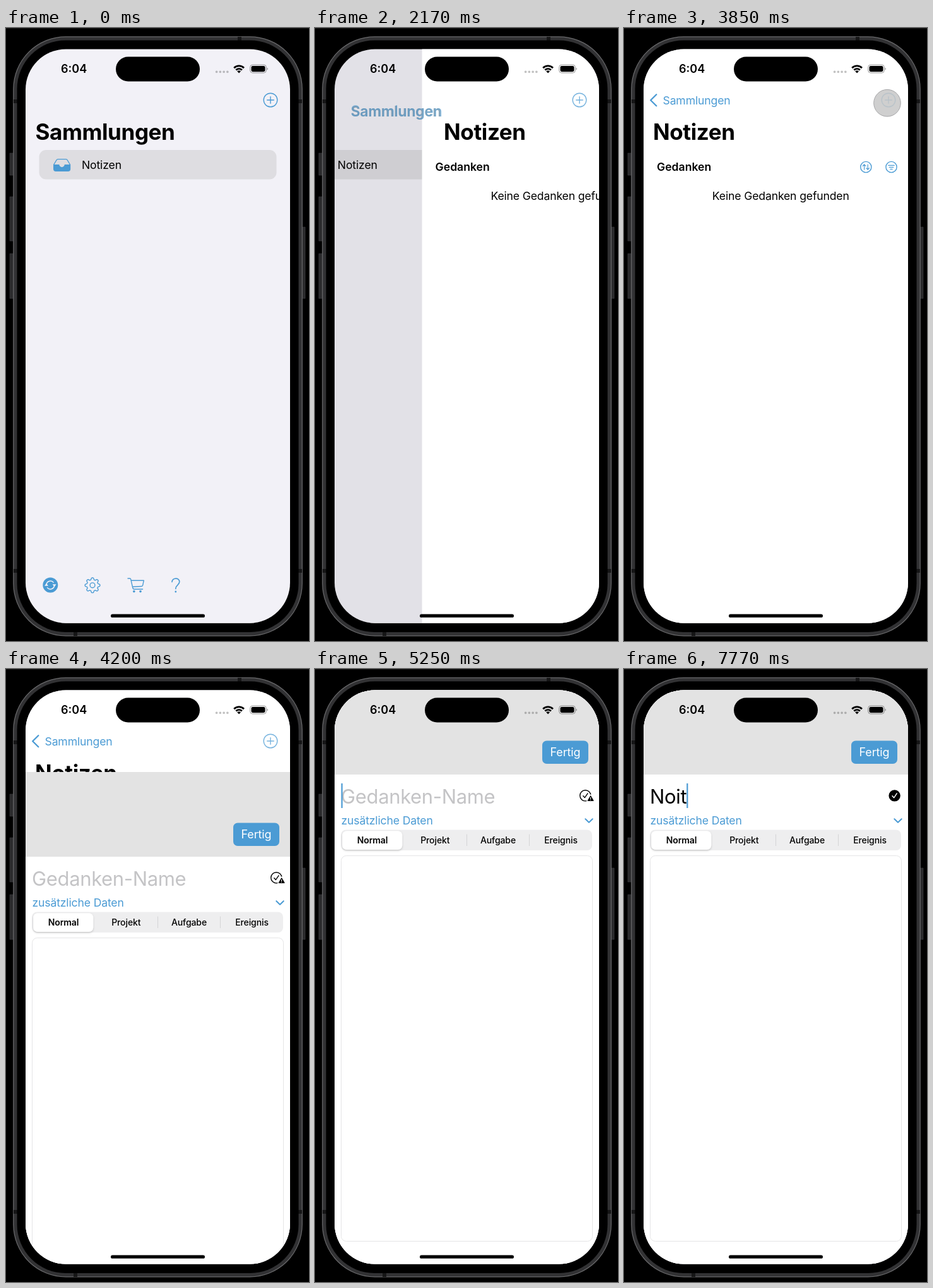
These frames come from a looping animation (480 by 970 pixels, 8 s). An HTML page:

```html
<!DOCTYPE html>
<html lang="de">
<head>
<meta charset="utf-8">
<title>Notizen</title>
<style>
  html, body { margin: 0; width: 100%; height: 100%; overflow: hidden; background: #000; }
  svg { display: block; width: 480px; height: 970px; }
  text { font: 17.6px Inter, sans-serif; letter-spacing: -.15px; white-space: pre; }
  .mid { text-anchor: middle; }
  .semi { font-weight: 600; letter-spacing: 0; }
  .large { font-size: 35px; font-weight: 700; letter-spacing: -.4px; }
  .name { font-size: 31px; letter-spacing: -.35px; }
  .seg { font-size: 14px; font-weight: 500; letter-spacing: -.1px; text-anchor: middle; }
  .blue { fill: #4b9bd4; }
  .line { fill: none; stroke: #4b9bd4; stroke-width: 1.4; stroke-linecap: round; stroke-linejoin: round; }
</style>
</head>
<body>
<svg viewBox="0 0 480 970">
  <defs>
    <clipPath id="screen"><rect x="31" y="33.5" width="419" height="908" rx="64"/></clipPath>
    <filter id="soft" x="-10%" y="-20%" width="120%" height="150%">
      <feDropShadow dx="0" dy="1.5" stdDeviation="1.5" flood-opacity=".2"/>
    </filter>
  </defs>

  <!-- phone body -->
  <path d="M0 .5H480" stroke="#161616"/>
  <path d="M6 198h6v35h-6zM6 267h6v70h-6zM6 357h6v71h-6zM469 315h5v113h-5z" fill="#2b2b2d" stroke="#3c3c3e" stroke-width=".6"/>
  <rect x="11.8" y="13.8" width="457.4" height="948" rx="83" fill="#323234" stroke="#6a6a6c" stroke-width="1.2"/>
  <path d="M12 116h6M463 116h6M12 859h6M463 859h6M370 14v6M110 956v6" stroke="#161617" stroke-width="6"/>
  <rect x="17.5" y="19.5" width="446" height="936.5" rx="77"/>

  <g clip-path="url(#screen)">
    <rect x="31" y="33" width="419" height="909" fill="#f2f1f7"/>

    <g id="list">
      <rect x="52.5" y="193" width="376" height="46.5" rx="11" fill="#dedde1"/>
      <path class="line" d="M75.8 216L80 209Q80.8 207.6 82.3 207.6H95Q96.4 207.6 97.2 209L101.4 216"/>
      <path class="blue" d="M75 216H84.3C84.8 221.5 92.3 221.5 92.8 216H102.2V223Q102.2 227 98.2 227H79Q75 227 75 223Z"/>
      <text x="120" y="223">Notizen</text>
    </g>

    <g id="tools">
      <circle class="blue" cx="70.3" cy="881.5" r="12"/>
      <path d="M64 880.5A6.5 6.5 0 0 1 75.5 877.6M76.6 882.5A6.5 6.5 0 0 1 65.1 885.4" fill="none" stroke="#f2f1f7" stroke-width="1.5"/>
      <path d="M73.6 880.3h6l-3 4zM61 882.7h6l-3-4z" fill="#f2f1f7"/>
      <path id="gear" class="line"/>
      <circle class="line" cx="137" cy="881.8" r="3.9"/>
      <path class="line" d="M193 871H196.3Q197.4 871 197.7 872.3L200.8 886Q201.3 888 203 888H216.5M198.2 874.2H218.3L216.7 881.6Q216.3 883.4 214.6 883.5L200.3 884.3"/>
      <g class="blue"><circle cx="202.8" cy="891.6" r="1.8"/><circle cx="213" cy="891.6" r="1.8"/><circle cx="268.8" cy="892" r="1.4"/></g>
      <path class="line" style="stroke-width:1.7" d="M263 876.5C263.3 869.4 274.8 869.2 274.8 876.3C274.8 881.5 268.8 881.3 268.8 887.3"/>
    </g>

    <rect id="dim" x="31" y="33" width="419" height="909"/>

    <g id="detail">
      <rect x="31" y="33" width="419" height="909" fill="#fff"/>
      <text class="semi" x="52" y="226.3">Gedanken</text>
      <text class="mid" x="248.3" y="272">Keine Gedanken gefunden</text>
      <g class="line">
        <circle cx="383.3" cy="220" r="8.6"/>
        <path d="M380.6 224V216M378.2 218.3L380.6 215.8L383 218.3M386.2 216V224M383.8 221.7L386.2 224.2L388.6 221.7" stroke-width="1.2"/>
        <circle cx="423.5" cy="220" r="8.6"/>
        <path d="M418.7 217.3H428.3M420.2 220.3H426.8M421.8 223.3H425.2" stroke-width="1.2"/>
      </g>
    </g>
    <text id="detailTitle" class="large" x="46" y="176.5">Notizen</text>
    <text id="bigBack" class="large" x="-1.5">Sammlungen</text>
    <text id="smallBack" class="blue" x="-1">Sammlungen</text>
    <path id="chevron" class="line" style="stroke-width:2.3" d="M51.3 105.3L42.2 114.3L51.3 123.3"/>
    <g id="plus" class="line">
      <circle cx="419" cy="114" r="10.8"/><path d="M413.7 114H424.3M419 108.7V119.3"/>
    </g>

    <g id="sheet">
      <rect x="31" y="33" width="419" height="909" fill="#fff"/>
      <rect x="31" y="33" width="419" height="134" fill="#e3e3e3"/>
      <rect class="blue" x="360" y="113.5" width="73" height="36.5" rx="7"/>
      <text class="mid" x="396.5" y="138.3" fill="#fff" style="font-size:18px">Fertig</text>
      <text id="name" class="name" x="41" y="212.8"></text>
      <rect id="caret" class="blue" y="181" width="2.2" height="39"/>
      <g id="warn" fill="none" stroke="#000" stroke-width="1.4" stroke-linecap="round" stroke-linejoin="round">
        <circle cx="428.3" cy="200.3" r="8.6"/>
        <path d="M424.8 200.8L427.3 203.6L432 196.8"/>
        <path d="M436.6 200.5L441 208.6H432.2Z" stroke="#fff" stroke-width="4"/>
        <path d="M436.6 201L440.8 208.4H432.4Z" fill="#000"/>
        <path d="M436.6 203.3V205.6M436.6 207.4V207.5" stroke="#fff" stroke-width="1.1"/>
      </g>
      <g id="done">
        <circle cx="428.6" cy="200.4" r="9.2"/>
        <path d="M425 200.8L427.6 203.8L432.2 196.9" fill="none" stroke="#fff" stroke-width="1.5" stroke-linecap="round" stroke-linejoin="round"/>
      </g>
      <text class="blue" x="41.5" y="245.8">zusätzliche Daten</text>
      <path class="line" style="stroke-width:2" d="M428.3 237.2L434 242.8L439.7 237.2"/>
      <rect x="41" y="254.5" width="398" height="32.5" rx="8" fill="#eeeeef"/>
      <rect x="43.2" y="256.2" width="95" height="29.8" rx="7" fill="#fff" filter="url(#soft)"/>
      <path d="M240.5 261.5V280M339.5 261.5V280" stroke="#d4d4d6"/>
      <text class="seg" x="91" y="276.3" style="font-weight:600">Normal</text>
      <text class="seg" x="190.3" y="276.3">Projekt</text>
      <text class="seg" x="290" y="276.3">Aufgabe</text>
      <text class="seg" x="389.5" y="276.3">Ereignis</text>
      <rect x="41.5" y="295.5" width="398" height="610" rx="8" fill="none" stroke="#e5e5e6"/>
    </g>

    <circle id="touch" r="21.3" fill="#bbb" fill-opacity=".7" stroke="#a5a5a7"/>

    <!-- status bar and home indicator -->
    <text class="semi" x="87" y="71.4" style="font-size:18px">6:04</text>
    <rect x="174" y="45.5" width="133" height="39" rx="19.5"/>
    <path d="M333.6 69.3H352" stroke="#000" stroke-opacity=".24" stroke-width="3.8" stroke-linecap="round" stroke-dasharray="0 5.75"/>
    <path d="M361.2 63.2A11.2 11.2 0 0 1 377 63.2M364.3 66.5A6.8 6.8 0 0 1 373.9 66.5" fill="none" stroke="#000" stroke-width="2.7"/>
    <path d="M369.1 71.6L366.2 68.6A4.1 4.1 0 0 1 372 68.6Z"/>
    <rect x="386.7" y="58.2" width="25.6" height="12.8" rx="4" fill="none" stroke="#000" stroke-opacity=".4"/>
    <rect x="388.5" y="60" width="22" height="9.2" rx="2.4"/>
    <path d="M413.6 62.4Q416.2 64.6 413.6 66.8Z" fill-opacity=".45"/>
    <rect x="166" y="927.6" width="149" height="5.2" rx="2.6"/>
  </g>
</svg>
<script>
const $ = id => document.getElementById(id);
const LOOP = 8000, STEP = 70, WIDTH = 419, HEIGHT = 908;
const TOUCHES = [[1890, 240, 217], [3850, 417, 118.7], [5110, 72, 208.3]];
const KEYS = [6230, 6650, 7210, 7770];

const lerp = (a, b, p) => a + (b - a) * p;
const clamp = v => Math.max(0, Math.min(1, v));
const show = (id, opacity) => $(id).setAttribute('opacity', clamp(opacity));
const move = (id, x, y, scale = 1) =>
  $(id).setAttribute('transform', `translate(${x} ${y}) scale(${scale})`);

// critically damped spring, 0 to 1
function spring(ms) {
  const x = Math.max(0, ms) * 0.01826;
  const p = 1 - (1 + x) * Math.exp(-x);
  return p > 0.9988 ? 1 : p;
}

function drawGear() {
  const points = Array.from({ length: 97 }, (_, i) => {
    const a = i / 96 * 2 * Math.PI;
    const r = 10.4 + 1.5 * Math.tanh(2 * Math.cos(8 * a));
    return `${137 + r * Math.sin(a)} ${881.8 - r * Math.cos(a)}`;
  });
  $('gear').setAttribute('d', 'M' + points.join('L') + 'Z');
}

function drawPush(p) {
  move('list', -0.3 * WIDTH * p, 0);
  show('tools', 1 - 1.7 * p);
  show('dim', 0.1 * p);
  move('detail', WIDTH * (1 - p), 0);
  move('detailTitle', 478 * (1 - p), 0);

  // the large title shrinks into the back button
  const x = lerp(48, 62.5, p), y = lerp(176.5, 120.5, p) + 6 * p * (1 - p);
  const width = lerp(222, 106, p);
  move('bigBack', x, y, width / 222);
  move('smallBack', x, y, width / 106);
  $('bigBack').setAttribute('fill', `rgb(${75 * p},${155 * p},${212 * p})`);
  show('bigBack', 1 - p * p);
  show('smallBack', p * p);
  show('chevron', (p - 0.7) / 0.3);
}

function drawName(t) {
  const typed = KEYS.filter(k => t >= k).length;
  const name = $('name');
  name.textContent = typed ? 'Noit'.slice(0, typed) : 'Gedanken-Name';
  name.setAttribute('fill', typed ? '#000' : '#c4c4c6');
  $('caret').setAttribute('x', typed ? 41 + name.getComputedTextLength() : 41.5);
  show('caret', typed ? 1 : t < 5180 ? 0 : 1 - (t - 5810) / 210);
  show('warn', typed ? 0 : 1);
  show('done', typed ? 1 : 0);
}

function draw(t) {
  const push = spring(t - 2044);
  drawPush(push);
  move('sheet', 0, HEIGHT * (1 - spring(t - 4012)));
  drawName(t);

  const touch = TOUCHES.find(([start]) => t >= start && t < start + 140);
  show('touch', touch ? 1 : 0);
  if (touch) move('touch', touch[1], touch[2]);

  const pressed = t >= 3850 ? lerp(0.4, 1, clamp((t - 3990) / 360)) : 1;
  show('plus', pressed * (1 - 1.1 * push * (1 - push)));
}

function tick(now) {
  draw(Math.floor(now % LOOP / STEP) * STEP);
  requestAnimationFrame(tick);
}

drawGear();
requestAnimationFrame(tick);
</script>
</body>
</html>
```
